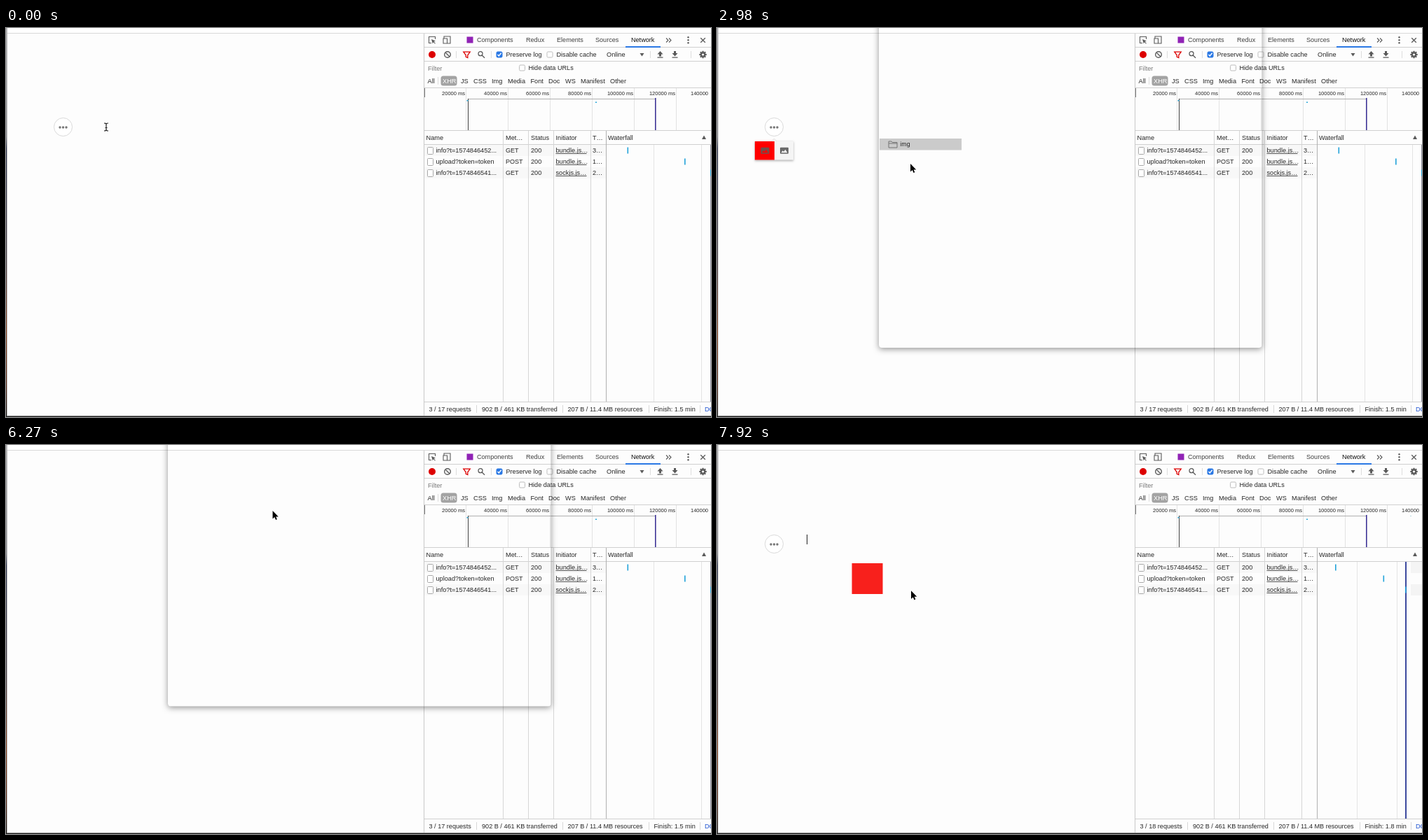
An HTML page with a canvas for the animation above (8000 ms loop, 1006 px wide and 556 px high).

```html
<!DOCTYPE html>
<html lang="en">
<head>
<meta charset="utf-8">
<title>Upload dialog</title>
<style>
html, body { margin: 0; width: 100%; height: 100%; overflow: hidden; background: #fdfdfd; }
canvas { display: block; width: 1006px; height: 556px; }
</style>
</head>
<body>
<canvas id="stage" width="1006" height="556"></canvas>
<script>
const W = 1006, H = 556, LOOP = 8000;
const c = document.getElementById('stage').getContext('2d');
const PANEL_FONT = '"Liberation Sans", Arial, sans-serif';
const SHEET_FONT = 'Inter, Roboto, sans-serif';

// ---------- helpers ----------
function text(s, x, y, { size = 9.2, color = '#262626', align = 'left', weight = 400, font = PANEL_FONT } = {}) {
  c.font = `${weight} ${size}px ${font}`;
  c.fillStyle = color;
  c.textAlign = align;
  c.fillText(s, x, y + size * 0.35);
}
const label = (s, x, y, style) => text(s, x, y, { font: SHEET_FONT, ...style });
function rect(x, y, w, h, color) {
  c.fillStyle = color;
  c.fillRect(x, y, w, h);
}
const hline = (x, y, w, color = '#d0d0d0') => rect(x, y, w, 1, color);
const vline = (x, y, h, color = '#d8d8d8') => rect(x, y, 1, h, color);
function round(x, y, w, h, r, fill, stroke) {
  c.beginPath();
  c.roundRect(x, y, w, h, r);
  if (fill) { c.fillStyle = fill; c.fill(); }
  if (stroke) { c.strokeStyle = stroke; c.lineWidth = 1; c.stroke(); }
}
function disc(x, y, r, color) {
  c.beginPath();
  c.arc(x, y, r, 0, 7);
  c.fillStyle = color;
  c.fill();
}
function glyph(path, x, y, { fill, stroke, width = 1 } = {}) {
  const p = new Path2D(path);
  c.save();
  c.translate(x, y);
  if (fill) { c.fillStyle = fill; c.fill(p, 'evenodd'); }
  if (stroke) { c.strokeStyle = stroke; c.lineWidth = width; c.stroke(p); }
  c.restore();
}
const within = (t, spans) => spans.some(([a, b]) => t >= a && t < b);

const ICON = {
  circle: 'M5 0A5 5 0 1 1 -5 0A5 5 0 1 1 5 0Z',
  folder: 'M-6 -4.5h4l1.2 1.5h6.8v7.5h-12zM-6 -1.5h12',
  page: 'M-4 -5h5l3 3v7h-8zM1 -5v3h3',
  clock: 'M-4 -5h8v10h-8zM0 -2v2.5h2',
  desk: 'M-5.5 -4.5h11v9h-11zM-5.5 -2.5h11M-2 2.5h4',
  home: 'M-6 0.5L0 -5L6 0.5M-4 -1V5H-1.2V1.5H1.2V5H4V-1',
  laptop: 'M-4.5 -4h9v6.5h-9zM-6.5 4.5h13',
  arrow: 'M0 0V11.6L2.7 9.1L4.5 13.1L6.3 12.3L4.6 8.5H8.2Z'
};

// ---------- browser page ----------
function page() {
  rect(0, 0, W, H, '#fdfdfd');
  rect(0, 0, W, 7, '#ffffff');
  hline(0, 7, W, '#d8d8d8');
}
function windowEdge() {
  const g = c.createLinearGradient(0, 0, 0, H);
  const stops = [[0, '#b5b5b8'], [0.28, '#8e8e94'], [0.31, '#2b3350'], [0.6, '#4a4048'],
    [0.78, '#8a4420'], [0.92, '#5a2a18'], [1, '#111111']];
  stops.forEach(([p, k]) => g.addColorStop(p, k));
  rect(0, 0, 1, H, g);
  vline(1, 0, H, '#b8b8b8');
  hline(1, 554, W, '#8a8a8a');
  hline(0, 555, W, '#1f1f1f');
}
function dots() {
  c.beginPath();
  c.arc(81.5, 141.5, 13, 0, 7);
  c.fillStyle = '#ffffff';
  c.fill();
  c.strokeStyle = '#d9d9d9';
  c.lineWidth = 1;
  c.stroke();
  for (const x of [77, 81.5, 86]) disc(x, 142, 1.7, '#777777');
}
function picture(x, color) {
  glyph('M-5 -4.5h10q1 0 1 1v7q0 1 -1 1h-10q-1 0 -1 -1v-7q0 -1 1 -1zM-4.5 3h9l-3 -4.5l-2.2 3l-1.6 -1.6z',
    x, 175.3, { fill: color });
}
function popup() {
  c.save();
  c.shadowColor = 'rgba(0,0,0,.3)';
  c.shadowBlur = 3;
  c.shadowOffsetY = 1;
  rect(54, 162, 55, 26.5, '#f5f5f5');
  c.restore();
  glyph('M-4 0L0 -4L4 0', 81.5, 162, { fill: '#f5f5f5', stroke: '#dddddd', width: 0.7 });
  rect(54, 162, 28, 26.5, '#ff0000');
  picture(68.5, '#70504c');
  picture(96, '#6a6a6a');
}

// ---------- network panel ----------
function check(x, y, on) {
  round(x - 4, y - 4, 8, 8, 1.5, on ? '#2a78e4' : '#ffffff', on ? '#2a78e4' : '#bdbdbd');
  if (on) glyph('M-2.5 0L-0.7 2L2.6 -2.3', x, y, { stroke: '#ffffff', width: 1.4 });
}
function toolbars() {
  const ink = '#5a5a5a', pen = { stroke: ink, width: 1.1 };
  // tabs
  glyph('M4.5 -1V-4.5H-4.5V4.5H-1', 608, 17, pen);
  glyph('M-1 -1L5 1.5L2.5 2.5L5 5L4 5.6L1.8 3.2L0.8 5.5Z', 608, 17, { fill: ink });
  glyph('M-4 -2V-5H5V5H1M-5 -2H0.5V5H-5Z', 629, 17, pen);
  rect(657.5, 12.5, 9, 9, '#9022b5');
  [['Components', 672], ['Redux', 742], ['Elements', 786], ['Sources', 841], ['Network', 892]]
    .forEach(([s, x]) => text(s, x, 17, { size: 9.1, color: s === 'Network' ? '#111111' : '#404040' }));
  hline(597, 27, 409);
  rect(884, 26, 50, 2, '#2a78e4');
  glyph('M-3.5 -3L-0.5 0L-3.5 3M0.5 -3L3.5 0L0.5 3', 945.5, 17.5, pen);
  for (const y of [13.3, 17.3, 21.3]) disc(973.5, y, 1.2, ink);
  glyph('M-3.3 -3.3L3.3 3.3M3.3 -3.3L-3.3 3.3', 994.5, 17.5, { stroke: ink, width: 1.3 });

  // controls
  disc(608, 38, 5, '#dd0000');
  glyph('M4.3 0A4.3 4.3 0 1 1 -4.3 0A4.3 4.3 0 1 1 4.3 0M-3 -3L3 3', 630, 38, { stroke: ink, width: 1.4 });
  glyph('M-4.7 -3.8H4.7L1.3 0.8V4.5L-1.3 3.4V0.8Z', 657.5, 38, { stroke: '#dd0000', width: 1.3 });
  glyph('M2 -1.3A3 3 0 1 1 -4 -1.3A3 3 0 1 1 2 -1.3M1.2 1L5 4.8', 678, 38, { stroke: ink, width: 1.3 });
  check(704, 38, true);
  text('Preserve log', 713.5, 38, { size: 9.1 });
  check(776, 38, false);
  text('Disable cache', 785.5, 38, { size: 9.1 });
  text('Online', 857, 38);
  glyph('M-3 -2H3L0 2.5Z', 907.5, 38, { fill: ink });
  glyph('M0 -5L4 -0.5H1.5V2.5H-1.5V-0.5H-4ZM-4 3.5H4V4.7H-4Z', 933.5, 38, { fill: ink });
  glyph('M0 2.5L4 -2H1.5V-5H-1.5V-2H-4ZM-4 3.5H4V4.7H-4Z', 954.5, 38, { fill: ink });
  for (const x of [642, 692, 919, 977]) vline(x, 33, 10, '#dddddd');
  c.save();
  c.translate(994.5, 38);
  for (let i = 0; i < 8; i++) { rect(-1.1, -5.2, 2.2, 3, ink); c.rotate(Math.PI / 4); }
  c.restore();
  glyph('M3.8 0A3.8 3.8 0 1 1 -3.8 0A3.8 3.8 0 1 1 3.8 0M1.6 0A1.6 1.6 0 1 0 -1.6 0A1.6 1.6 0 1 0 1.6 0',
    994.5, 38, { fill: ink });
  hline(597, 47, 409);

  // filters
  text('Filter', 602, 57.5, { color: '#7a7a7a' });
  check(736.5, 57, false);
  text('Hide data URLs', 745.5, 57, { size: 9.1 });
  round(620.5, 68.5, 23, 14, 3.5, '#a3a3a3');
  vline(616, 70, 11, '#dddddd');
  [['All', 601.5], ['XHR', 623], ['JS', 649], ['CSS', 667], ['Img', 693], ['Media', 716], ['Font', 748.5],
    ['Doc', 774], ['WS', 798], ['Manifest', 820], ['Other', 862]]
    .forEach(([s, x]) => text(s, x, 75.5, { color: s === 'XHR' ? '#ffffff' : '#262626' }));
  hline(597, 85, 409);
}
function overview(done) {
  for (let i = 1; i <= 7; i++) {
    const x = 596 + 60 * i;
    if (i < 7) vline(x, 86, 60, '#e2e2e2');
    text(i < 7 ? `${i * 20000} ms` : '140000', i < 7 ? x - 1 : 1002, 93, { size: 7.5, align: 'right' });
  }
  rect(597, 86, 1, 13, '#777777');
  hline(659, 101, 267, '#b0b0b0');
  vline(659, 101, 45, '#404040');
  rect(926, 100, 1, 46, '#3a3298');
  rect(927, 100, 1, 46, '#8f86bd');
  rect(657.5, 103, 2, 1.5, '#2ba7d8');
  rect(841, 105.5, 2, 1.5, '#2ba7d8');
  if (done) rect(989, 101, 2, 1, '#b8d8e0');
  hline(597, 146, 409);
}
function requests(done) {
  const cols = [[599.5, 'Name'], [713, 'Met…'], [749, 'Status'], [784.5, 'Initiator'], [837, 'T…'], [859, 'Waterfall']];
  const rows = [
    ['info?t=1574846452...', 'GET', 'bundle.js…', '3…'],
    ['upload?token=token', 'POST', 'bundle.js…', '1…'],
    ['info?t=1574846541...', 'GET', 'sockjs.js…', '2…']
  ];
  rows.forEach((r, i) => {
    const y = 175 + 16 * i;
    if (i !== 1) {
      rect(597, y - 8, 259, 16, '#f8f8f8');
      if (done) rect(990, y - 8, 16, 16, '#f4f4f4');
    }
    round(601.5, y - 4.5, 8, 10, 1, '#ffffff', '#a8a8a8');
    text(r[0], 613.5, y);
    text(r[1], 713, y, { size: 9 });
    text('200', 749, y);
    text(r[2], 784.5, y);
    hline(784.5, y + 4, 44, '#555555');
    text(r[3], 837, y);
  });
  cols.forEach(([x, s]) => text(s, x, 156.5));
  glyph('M-3 2.5H3L0 -3Z', 996, 156.5, { fill: '#5a5a5a' });
  hline(597, 166, 409);
  for (const x of [709, 745, 781, 834]) vline(x, 147, 387, '#d6d6d6');
  vline(856, 147, 387, '#b0b0b0');

  const grid = done ? [913, 970] : [924, 992];
  grid.forEach(x => vline(x, 167, 367, '#e4e4e4'));
  if (done) rect(982, 167, 2, 367, '#3d4a9e');
  else vline(1005, 167, 367, '#8f8f9d');
  const ticks = done ? [882, 950.5, 982] : [886.5, 968, 1005];
  ticks.forEach((x, i) => rect(x, 170.5 + 16 * i, 1.6, 9, '#22a3da'));
}
function footer(done) {
  hline(597, 534, 409);
  const size = 9.12;
  text(`3 / ${done ? 18 : 17} requests`, 603.5, 545, { size });
  text('902 B / 461 KB transferred', 679, 545, { size });
  text('207 B / 11.4 MB resources', 801.5, 545, { size });
  text(`Finish: ${done ? '1.8' : '1.5'} min`, 924.5, 545, { size });
  text('DOMContentLoaded', 997, 545, { size, color: '#1a4fd0' });
  for (const x of [671, 794, 917, 990]) vline(x, 539, 11, '#d8d8d8');
}
function panel(done) {
  rect(596, 8, 410, 547, '#fdfdfd');
  toolbars();
  overview(done);
  requests(done);
  footer(done);
  vline(596, 8, 546, '#c8c8c8');
}

// ---------- file sheet ----------
const SX = 231, SW = 546.5, SB = 458;

function sheetEdge(bottom) {
  c.save();
  c.beginPath();
  c.rect(0, 0, W, H);
  c.roundRect(SX, -20, SW, bottom + 20, 4);
  c.clip('evenodd');
  c.shadowColor = 'rgba(0,0,0,.42)';
  c.shadowBlur = 8;
  c.shadowOffsetY = 2;
  round(SX, -20, SW, bottom + 20, 4, '#c4c4c4');
  c.restore();
}
const PLACES = [
  ['Recents', 35, 'clock'], ['Downloads', 51.5, 'circle'], ['Desktop', 68, 'desk'],
  ['screenshots', 85, 'folder'], ['Documents', 101.5, 'page'], ['Applications', 118, 'circle'],
  ['velumi', 134.5, 'home'], ['work', 151, 'folder'], ['img', 168, 'folder'],
  ['nbk2016', 204, 'laptop'], ['All…', 240, 'circle'], ['Music', 273.5, 'note'],
  ['Photos', 290, 'camera'], ['Movies', 306.5, 'film']
];
const EXTRA = {
  Downloads: 'M0 -3V2.5M-2.3 0.3L0 2.7L2.3 0.3',
  Applications: 'M-2.6 3L0.4 -3M2.6 3L-0.4 -3M-3 1.2H3',
  'All…': 'M-5 0H5M0 -5C-3 -2 -3 2 0 5C3 2 3 -2 0 -5M-4 -2.5H4M-4 2.5H4'
};
const SOLID = {
  note: 'M-2 -5L4 -6V2.5A2 1.7 0 1 1 3 1V-3.3L-1 -2.6V4A2 1.7 0 1 1 -2 2.5Z',
  camera: 'M-6 -3H-3L-2 -4.5H2L3 -3H6V4.5H-6ZM2.5 0.7A2.5 2.5 0 1 0 -2.5 0.7A2.5 2.5 0 1 0 2.5 0.7',
  film: 'M-5 -5.5H5V5.5H-5ZM-2.5 -4.5H2.5V-0.5H-2.5ZM-2.5 0.5H2.5V4.5H-2.5Z'
};
function place([name, y, icon]) {
  const pen = { stroke: '#737373', width: 1 };
  if (SOLID[icon]) glyph(SOLID[icon], 251, y, { fill: '#737373' });
  else glyph(ICON[icon], 251, y, pen);
  if (EXTRA[name]) glyph(EXTRA[name], 251, y, pen);
  label(name, 261.3, y, { size: 8.27, color: '#262626' });
}

const DATES = ['November 18, 2019 16:45', 'November 19, 2019 12:40', 'November 3, 2018 13:49', 'September 26, 2019 3:52'];
// name, date, size in KB, thumbnail back, front, shape
const FILES = [
  ['bg_program_s.jpg', 0, 45, '#aab2c4', '#66728c', 'bar'],
  ['logo-10.jpg', 1, 6, '#ffffff', '#e8322c', 'box'],
  ['logo-29.jpg', 0, 5, '#ffffff', '#e0463f', 'dot'],
  ['logo-30.jpg', 0, 3, '#ffffff', '#777777', 'dash'],
  ['logo-31.jpg', 1, 4, '#ffffff', '#f08078', 'dash'],
  ['pic1.jpg', 2, 18, '#7189a2', '#26364d', 'man'],
  ['pic2.jpg', 2, 23, '#2a2927', '#96846a', 'man'],
  ['pic3.jpg', 2, 20, '#2f4e9a', '#b38b74', 'man'],
  ['speakers1_p.jpg', 1, 24, '#e4e6e6', '#59616a', 'man'],
  ['speakers4_p.jpg', 1, 46, '#ded5d0', '#30292b', 'man'],
  ['use_g2.jpg', 1, 10, '#ffffff', '#38b54a', 'dot'],
  ['use_g3.jpg', 1, 18, '#e2f2d8', '#5fbd3a', 'bar'],
  ['video-001.q50.440.jpeg', 3, 4, '#4a2420', '#d6895c', 'bar']
];
function thumb(y, back, front, shape) {
  const tall = shape === 'man', w = tall ? 9 : 11, h = tall ? 10 : 8;
  const x = 375;
  round(x - w / 2, y - h / 2, w, h, 0.5, back, '#cfcfcf');
  if (shape === 'box') rect(x - 2.5, y - 2.5, 5, 5, front);
  if (shape === 'dot') disc(x, y, 3.4, front);
  if (shape === 'dash') rect(x - 3.5, y - 0.8, 7, 1.8, front);
  if (shape === 'bar') rect(x - 4, y - 1, 8, 3, front);
  if (tall) {
    disc(x, y - 1.5, 2, front);
    rect(x - 3, y + 1, 6, 4, front);
  }
}
function button(name, x, w, on) {
  round(x + 0.5, 436.5, w, 14.5, 3, on ? '#ffffff' : '#f3f3f3', on ? '#c9c9c9' : '#e0e0e0');
  label(name, x + w / 2 + 0.5, 443.8, { size: 9.77, align: 'center', color: on ? '#1c1c1c' : '#b3b3b3' });
}
function sheet() {
  sheetEdge(SB);
  c.save();
  c.beginPath();
  c.roundRect(SX, -20, SW, SB + 20, 4);
  c.clip();
  rect(SX, 0, SW, SB, '#ececec');
  rect(SX, 9, 118, 421, '#f1f1f1');
  rect(349, 9, 429, 421, '#ffffff');
  vline(348, 9, 421, '#dcdcdc');
  hline(SX, 8, SW, '#cccccc');
  hline(SX, 429, SW, '#dedede');

  // lower edges of the toolbar controls
  [[237, 34], [280, 35], [315, 55], [391, 34], [432, 145], [609, 34], [685, 86]]
    .forEach(([x, w]) => round(x + 0.5, -12, w, 16, 3, '#ffffff', '#c6c6c6'));
  rect(342, 0, 22, 4, '#6a6a6a');
  vline(296, 0, 4, '#c6c6c6');
  label('img', 461, -2.5, { size: 9.77 });

  [['Favorites', 20.5], ['Devices', 190], ['Shared', 226], ['Media', 261.5]]
    .forEach(([s, y]) => label(s, 238, y, { size: 8.27, color: '#777777', weight: 500 }));
  PLACES.forEach(place);

  const head = { size: 8.27, color: '#333333' };
  label('Name', 353.7, 18, { ...head, color: '#1c1c1c', weight: 500 });
  glyph('M-2.5 1.5L0 -1.5L2.5 1.5', 566, 18.5, { stroke: '#555555', width: 1.2 });
  label('Date Modified', 584, 18, head);
  label('Size', 718, 18, head);
  vline(578, 12, 13);
  vline(708, 12, 13);
  hline(349, 26, 429, '#e0e0e0');

  const dim = { size: 9.02, color: '#7a7a7a' };
  FILES.forEach(([name, date, kb, back, front, shape], i) => {
    const y = 36 + 14.36 * i;
    thumb(y + 0.5, back, front, shape);
    label(name, 383.7, y, { size: 9.02, color: '#1c1c1c' });
    label(DATES[date], 583, y, dim);
    label(`${kb} KB`, 773, y, { ...dim, align: 'right' });
  });
  button('Options', 237, 62, true);
  button('Cancel', 647, 58, true);
  button('Open', 712, 58, false);
  c.restore();
}
function sheetAt(t) {
  if (t < 2830 || t >= 6570) return;
  if (t < 2980) sheetEdge(SB * 0.55);
  else if (t < 3130) {
    sheetEdge(SB - 1);
    rect(232, 158, 117, 16.5, '#cbcbcb');
    place(['img', 166.5, 'folder']);
  } else if (t < 6120) sheet();
  else sheetEdge(SB - 1 - 83.5 * Math.floor((t - 6120) / 150));
}

// ---------- pointer ----------
// first step, last step, step count, goal x, goal y
const MOVES = [
  [150, 600, 4, 80, 141], [1490, 2090, 5, 92.5, 171.5], [2830, 2980, 2, 276, 194],
  [3130, 3130, 1, 413, 194], [3430, 4020, 5, 381.8, 94], [4770, 5070, 3, 382, 106],
  [5220, 5520, 3, 380.5, 94], [7770, 7920, 2, 277, 208.3]
];
function pointerAt(t) {
  let x = 143, y = 141.5;
  for (const [from, to, n, gx, gy] of MOVES) {
    if (t < from) break;
    const k = n === 1 ? 1 : Math.min(n, 1 + Math.floor((t - from) * (n - 1) / (to - from)));
    const p = k / n, e = p * p * (3 - 2 * p);
    x += (gx - x) * e;
    y += (gy - y) * e;
  }
  return [x, y];
}
function pointer(t) {
  const [x, y] = pointerAt(t);
  if (t < 600 && x > 96) {
    glyph('M-3 -5.5Q0 -5.5 0 -4Q0 -5.5 3 -5.5M0 -4V4M-3 5.5Q0 5.5 0 4Q0 5.5 3 5.5M-1.5 1H1.5', x, y,
      { stroke: '#222222', width: 1.2 });
    return;
  }
  glyph(ICON.arrow, x, y, { stroke: '#ffffff', width: 1.6 });
  glyph(ICON.arrow, x, y, { fill: '#000000' });
}

// ---------- timeline ----------
const CARET = [[300, 740], [1190, 1640], [7020, 7470], [7920, LOOP]];

function draw(t) {
  const done = t >= 6720;
  page();
  if (t < 3130 || t >= 6570) dots();
  if (within(t, CARET)) vline(128, 128, 14, '#222222');
  if (within(t, [[890, 3130]])) popup();
  if (t >= 6870) rect(192.5, 169, 44, 44, '#f8201c');
  panel(done);
  sheetAt(t);
  windowEdge();
  pointer(t);
}
const start = performance.now();
function tick() {
  draw((performance.now() - start) % LOOP);
  requestAnimationFrame(tick);
}
tick();
</script>
</body>
</html>
```
